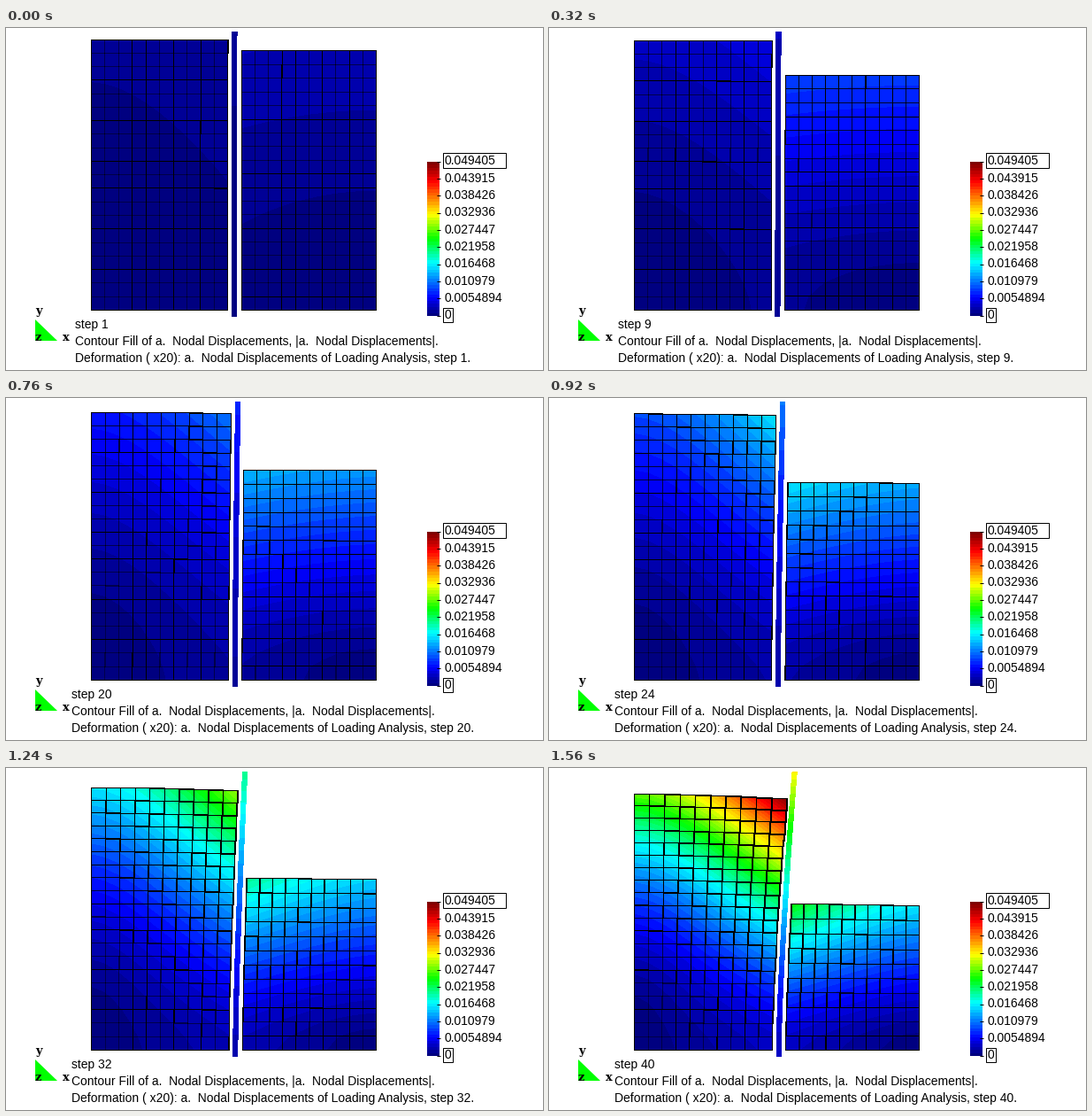
Recreate the animation shown at these times as a matplotlib script. Size 607 by 386 pixels, loop 1600 ms.

```python
import math

import numpy as np
import matplotlib.pyplot as plt
from matplotlib.animation import FuncAnimation
from matplotlib.collections import LineCollection
from matplotlib.colors import LinearSegmentedColormap
from matplotlib.patches import Polygon, Rectangle

W, H, DPI = 607, 386, 100
STEPS = 40
BANDS = 50
FULL = 30.1            # pixels of movement at the top of the scale
BASE, ROW = 318.4, 15.3
PX = 72 / DPI          # points per pixel

# Load history: values at a few steps, interpolated in between
KEYS = [1, 9, 16, 20, 28, 36, 40]
HISTORY = {
    "slide": [0.4, 0.7, 1.0, 1.1, 1.4, 1.8, 2.0],
    "lean": [0.3, 1.1, 1.9, 3.2, 7.3, 13.6, 17.3],
    "settle": [0.75, 2.0, 3.0, 4.0, 7.0, 12.3, 16.7],
    "tilt": [0.1, 0.3, 0.7, 1.0, 2.3, 4.7, 5.8],
    "heave": [1.7, 5.1, 6.5, 7.8, 9.4, 11.5, 12.3],
    "sag": [0.0, 0.0, 0.2, 0.3, 0.8, 2.0, 2.7],
}

ramp = LinearSegmentedColormap.from_list("ramp", [
    (0.0, (0, 0, 0.5)), (0.11, (0, 0, 1)), (0.34, (0, 1, 1)),
    (0.5, (0, 1, 0)), (0.66, (1, 1, 0)), (0.88, (1, 0, 0)),
    (1.0, (0.5, 0, 0))])
palette = ramp(np.linspace(0, 1, BANDS))
levels = np.linspace(0, 1, BANDS + 1)

fig = plt.figure(figsize=(W / DPI, H / DPI), dpi=DPI, facecolor="white")
ax = fig.add_axes([0, 0, 1, 1])
ax.set_xlim(0, W)
ax.set_ylim(H, 0)
ax.axis("off")


def label(x, y, text, size=13.94, **kw):
    kw.setdefault("family", "Liberation Sans")
    return ax.text(x, y, text, fontsize=size * PX, va="baseline", zorder=6, **kw)


def frame_box(x, y, w, h):
    ax.add_patch(Rectangle((x, y), w, h, fill=False, ec="black", lw=PX,
                           snap=False))


def draw_legend():
    top, bottom = 151, 325
    ax.imshow(palette[::-1, None, :], extent=(476, 490, bottom, top),
              aspect="auto", interpolation="nearest")
    values = ["0.049405", "0.043915", "0.038426", "0.032936", "0.027447",
              "0.021958", "0.016468", "0.010979", "0.0054894", "0"]
    for k, value in enumerate(values):
        y = top + (bottom - top) * k / 9
        tick = math.floor(y) + 0.5
        ax.plot([488, 491], [tick, tick], color="black", lw=PX, snap=False)
        label(496, y + 3.4, value)
    frame_box(494.5, 141.5, 71, 17)
    frame_box(494.5, 316.5, 11, 16)


def draw_axes_icon():
    ax.add_patch(Polygon([(33, 328.5), (33, 353), (58, 353)], fc="#00ff00",
                         ec="none"))
    for x, y, name in [(33, 323, "y"), (33, 353, "z"), (64, 353, "x")]:
        label(x, y, name, size=13, family="DejaVu Serif", weight="bold")


def push(v, p):
    """Sideways movement of the wall at relative height v."""
    return p["slide"] + p["lean"] * np.clip(v, 0, None) ** 1.4


def left_block(p):
    u, v = np.meshgrid(np.linspace(0, 1, 11), np.linspace(0, 1, 21))
    dx = push(v, p) * u
    power = 1.3 + p["time"] * (0.8 - 0.35 * u)
    dy = (p["settle"] + p["tilt"] * u ** 1.5) * v ** power
    return 96.5 + 153.8 * u + dx, BASE - 20 * ROW * v + dy, np.hypot(dx, dy)


def right_block(p, rows):
    u, j = np.meshgrid(np.linspace(0, 1, 11), np.arange(rows + 1))
    dx = push(j / 20, p) * (1 - u)
    dy = -(p["heave"] - p["sag"] * u) * (j / rows) ** 1.35
    return 265.7 + 152.8 * u + dx, BASE - ROW * j + dy, np.hypot(dx, dy)


def wall(p):
    side, y = np.meshgrid([-2.6, 2.6], np.linspace(326, 4, 30))
    dx = push((BASE - y) / (20 * ROW), p)
    return 257.7 + side + dx, y, dx


def fill(x, y, move):
    return ax.contourf(x, y, np.clip(move / FULL, 0, 0.9999), levels=levels,
                       colors=palette, antialiased=False, zorder=2)


def mesh(x, y, move, strong_rows, strong_cols=(3, 4, 6, 8)):
    """Crisp one-pixel grid lines, fainter where the block hardly moves."""
    pts = np.floor(np.stack((x, y), -1)) + 0.5
    segs, alphas = [], []
    for axis, strong in ((0, strong_rows), (1, strong_cols)):
        p = pts if axis == 0 else pts.swapaxes(0, 1)
        m = move if axis == 0 else move.T
        a = 0.4 + 0.6 * np.clip((m[:, :-1] + m[:, 1:]) / (0.4 * FULL), 0, 1)
        solid = [k for k in strong if k < len(a)] + [0, len(a) - 1]
        a[solid] = 1
        segs.append(np.stack((p[:, :-1], p[:, 1:]), 2).reshape(-1, 2, 2))
        alphas.append(a.ravel())
    alpha = np.concatenate(alphas)
    colors = np.zeros((len(alpha), 4))
    colors[:, 3] = alpha
    lines = LineCollection(np.concatenate(segs), colors=colors, linewidths=PX,
                           antialiaseds=False, snap=False, zorder=3)
    return ax.add_collection(lines, autolim=False)


draw_legend()
draw_axes_icon()
captions = [label(78, y, "") for y in (339, 358, 377)]
shapes = []


def update(k):
    step = k + 1
    p = {name: np.interp(step, KEYS, vals) for name, vals in HISTORY.items()}
    p["time"] = k / (STEPS - 1)
    rows = 20 - math.ceil(step / 4)    # one layer is dug out every four steps

    while shapes:
        shapes.pop().remove()
    left, right = left_block(p), right_block(p, rows)
    shapes.extend(fill(*part) for part in (left, right, wall(p)))
    shapes.append(mesh(*left, strong_rows=(3, 6, 9, 11, 14, 17)))
    shapes.append(mesh(*right, strong_rows=(1, 3, 6, 9, 10, 14)))

    texts = (f"step {step}",
             "Contour Fill of a.  Nodal Displacements, |a.  Nodal Displacements|.",
             "Deformation ( x20): a.  Nodal Displacements of Loading Analysis, "
             f"step {step}.")
    for caption, text in zip(captions, texts):
        caption.set_text(text)
        caption.set_x(78 if step < 10 else 74)
    return captions


anim = FuncAnimation(fig, update, frames=STEPS, interval=40, repeat=True,
                     repeat_delay=0, blit=False)
plt.show()
```
